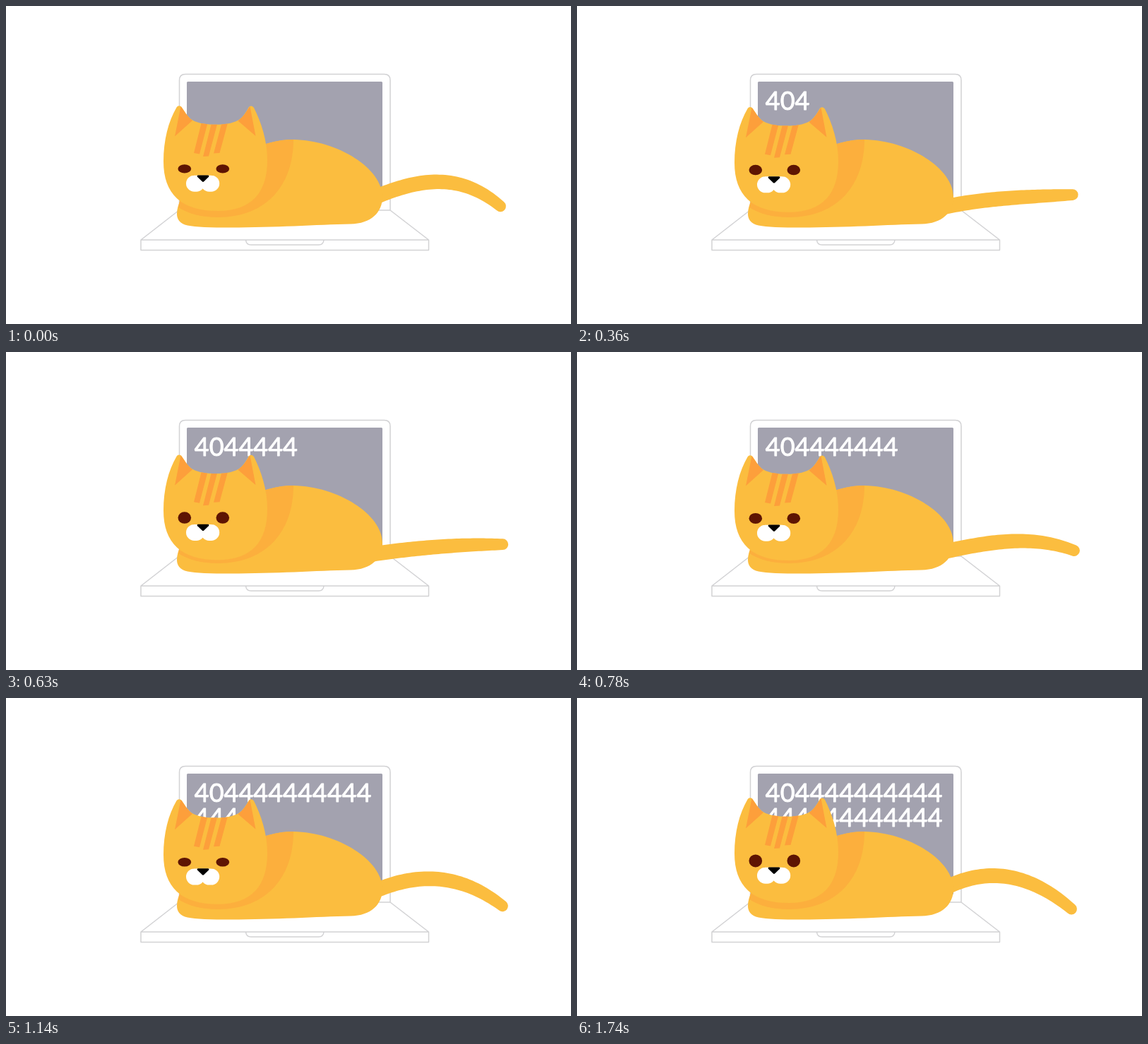
These frames come from a looping animation (800x450 px, 1800 ms). An HTML page with a canvas:

```html
<!DOCTYPE html>
<html lang="en">
<head>
<meta charset="utf-8">
<title>Cat on a laptop</title>
<style>
html, body { margin: 0; width: 100%; height: 100%; overflow: hidden; background: #fff; }
canvas { display: block; width: 800px; height: 450px; }
</style>
</head>
<body>
<canvas id="stage" width="800" height="450"></canvas>
<script>
const ctx = document.getElementById('stage').getContext('2d');
const LOOP = 1800, STEP = 30;
const FUR = '#fbbd3f', SHADE = '#fcaf3d', STRIPE = '#fd9f3b', LINE = '#d2d2d4';

const body = new Path2D('M340 206C362 195 386 189 407 189C470 190 533 230 533 270C533 292 517 308 488 308.5C440 309.5 380 313.5 318 313.5C290 313.5 268 313 257 310.5C246 308 242 302 242 294C242 287 244 281 247 275Z');
const neck = new Path2D('M340 206C362 195 386 189 407 189C407 252 370 299 300 299C276 299 259 294 244 285L247 270Z');
const head = new Path2D('M241.5 143.5C243.5 140.5 247 140.8 249 143.5C253 149 257 157 264 161.5C273 166.5 285 167.8 297 167.8C309 167.8 320 166.5 329 161.5C336 157 340 150 343.5 143.5C345.5 140.6 349 140.8 351 144C361 164 370 190 370 218C370 264 348 290 300 290C248 290 223 266 223 220C223 190 230 163 241.5 143.5Z');
const ears = new Path2D('M247.5 142C253 149 257 157 264 162L239 184.5ZM345.5 142C340 150 336 157 328.5 162.5L353.5 184Z');
const stripes = new Path2D('M278 160H287L274 209.5L266 208ZM292.5 160H301L287 212.5L279 213ZM307 160H315.5L302.5 208L294 208.5Z');
const nose = new Path2D('M272 239.5H286C287.5 239.5 287.8 241 286.8 242L280.3 248.3Q279 249.5 277.7 248.3L271.2 242C270.2 241 270.5 239.5 272 239.5Z');

// Each key: time, then the values that hold there.
const tailKeys = [
  [0, 700, 271.5, 252, 252, 283.3],
  [210, 701, 280, 265, 261.2, 270.8],
  [510, 702.5, 287, 281, 276, 267],
  [780, 704, 282.5, 271, 268, 281],
  [1140, 703, 274, 256.8, 262, 294.3],
  [1440, 700, 269.5, 251.8, 261.3, 298.5],
  [1800, 700, 269.5, 251.8, 261.3, 298.5]
];
const nodKeys = [[0, 0], [210, 0.5], [510, 3], [780, 5], [1140, 1.8], [1440, 0], [1800, 0]];
const eyeKeys = [[0, 6.2], [210, 6.2], [510, 8.4], [780, 7.5], [1140, 6.3], [1440, 9], [1590, 6.3], [1710, 9], [1800, 9]];

// Smooth curve through the keys, flat next to holds.
function track(keys, t, col) {
  let i = 0;
  while (i < keys.length - 2 && t >= keys[i + 1][0]) i++;
  const slope = k => {
    const a = keys[Math.max(k - 1, 0)], b = keys[k], c = keys[Math.min(k + 1, keys.length - 1)];
    if ((a !== b && a[col] === b[col]) || (c !== b && c[col] === b[col])) return 0;
    return (c[col] - a[col]) / (c[0] - a[0]);
  };
  const p = keys[i], q = keys[i + 1], d = q[0] - p[0], u = (t - p[0]) / d;
  const u2 = u * u, u3 = u2 * u;
  return (2 * u3 - 3 * u2 + 1) * p[col] + (u3 - 2 * u2 + u) * d * slope(i)
    + (3 * u2 - 2 * u3) * q[col] + (u3 - u2) * d * slope(i + 1);
}

function fill(path, color) {
  ctx.fillStyle = color;
  ctx.fill(path);
}

function laptop() {
  ctx.strokeStyle = LINE;
  ctx.lineWidth = 1.5;
  ctx.lineJoin = 'round';
  ctx.stroke(new Path2D('M245.5 289V105Q245.5 96.5 254 96.5H535.5Q544 96.5 544 105V289Z'));
  ctx.stroke(new Path2D('M245 289L191 331H598.5L544 289M191 331V345.5H598.5V331'));
  ctx.stroke(new Path2D('M339.5 331Q340 338 347 338H442.5Q449.5 338 450 331'));
  ctx.fillStyle = '#a3a2af';
  ctx.beginPath();
  ctx.roundRect(256, 107, 277, 171, 1.5);
  ctx.fill();
}

function typing(t) {
  const count = Math.max(0, Math.min(24, Math.floor((t - 130) / 66.7)));
  const text = ('40' + '4'.repeat(22)).slice(0, count);
  ctx.font = '36px Lato, sans-serif';
  ctx.fillStyle = ctx.strokeStyle = '#fff';
  ctx.lineWidth = 0.9;
  [text.slice(0, 12), text.slice(12)].forEach((row, i) => {
    ctx.fillText(row, 266.8, 147 + i * 35);
    ctx.strokeText(row, 266.8, 147 + i * 35);
  });
}

function tail(t) {
  const [tipX, a, b, c, d] = [1, 2, 3, 4, 5].map(col => track(tailKeys, t, col));
  const x0 = 520, span = tipX - x0, n = 48;
  // Cubic through four evenly spaced heights.
  const yAt = u => {
    const v = 3 * u;
    return -a * (v - 1) * (v - 2) * (v - 3) / 6 + b * v * (v - 2) * (v - 3) / 2
      - c * v * (v - 1) * (v - 3) / 2 + d * v * (v - 1) * (v - 2) / 6;
  };
  const angle = u => Math.atan2(yAt(u + 0.005) - yAt(u - 0.005), span * 0.01);
  const half = u => 10.6 - 2.7 * u * u * u;
  const edge = (u, side) => {
    const g = angle(u), r = half(u) * side;
    ctx.lineTo(x0 + span * u - Math.sin(g) * r, yAt(u) + Math.cos(g) * r);
  };
  ctx.beginPath();
  for (let i = 0; i <= n; i++) edge(i / n, -1);
  const g = angle(1);
  ctx.arc(tipX, d, half(1), g - Math.PI / 2, g + Math.PI / 2);
  for (let i = n; i >= 0; i--) edge(i / n, 1);
  ctx.closePath();
  ctx.fillStyle = FUR;
  ctx.fill();
}

function face(t) {
  ctx.save();
  ctx.translate(0, track(nodKeys, t, 1));
  fill(head, FUR);
  ctx.save();
  ctx.clip(head);
  fill(ears, STRIPE);
  fill(stripes, STRIPE);
  ctx.restore();

  const ry = track(eyeKeys, t, 1);
  ctx.fillStyle = '#5e1503';
  for (const x of [252.8, 306.8]) {
    ctx.beginPath();
    ctx.ellipse(x, 230.4, 9.3, ry, 0, 0, Math.PI * 2);
    ctx.fill();
  }

  ctx.fillStyle = '#fff';
  ctx.beginPath();
  for (const x of [255, 276]) ctx.roundRect(x, 239.7, 26.2, 23, 11.5);
  ctx.rect(266, 239.7, 25, 14);
  ctx.fill();
  fill(nose, '#000');
  ctx.restore();
}

function draw(t) {
  ctx.fillStyle = '#fff';
  ctx.fillRect(0, 0, 800, 450);
  laptop();
  typing(t);
  tail(t);
  fill(body, FUR);
  fill(neck, SHADE);
  face(t);
}

const start = performance.now();
function frame() {
  const t = (performance.now() - start) % LOOP;
  draw(Math.min(Math.floor(t / STEP) * STEP, LOOP - 2 * STEP));
  requestAnimationFrame(frame);
}
frame();
</script>
</body>
</html>
```
